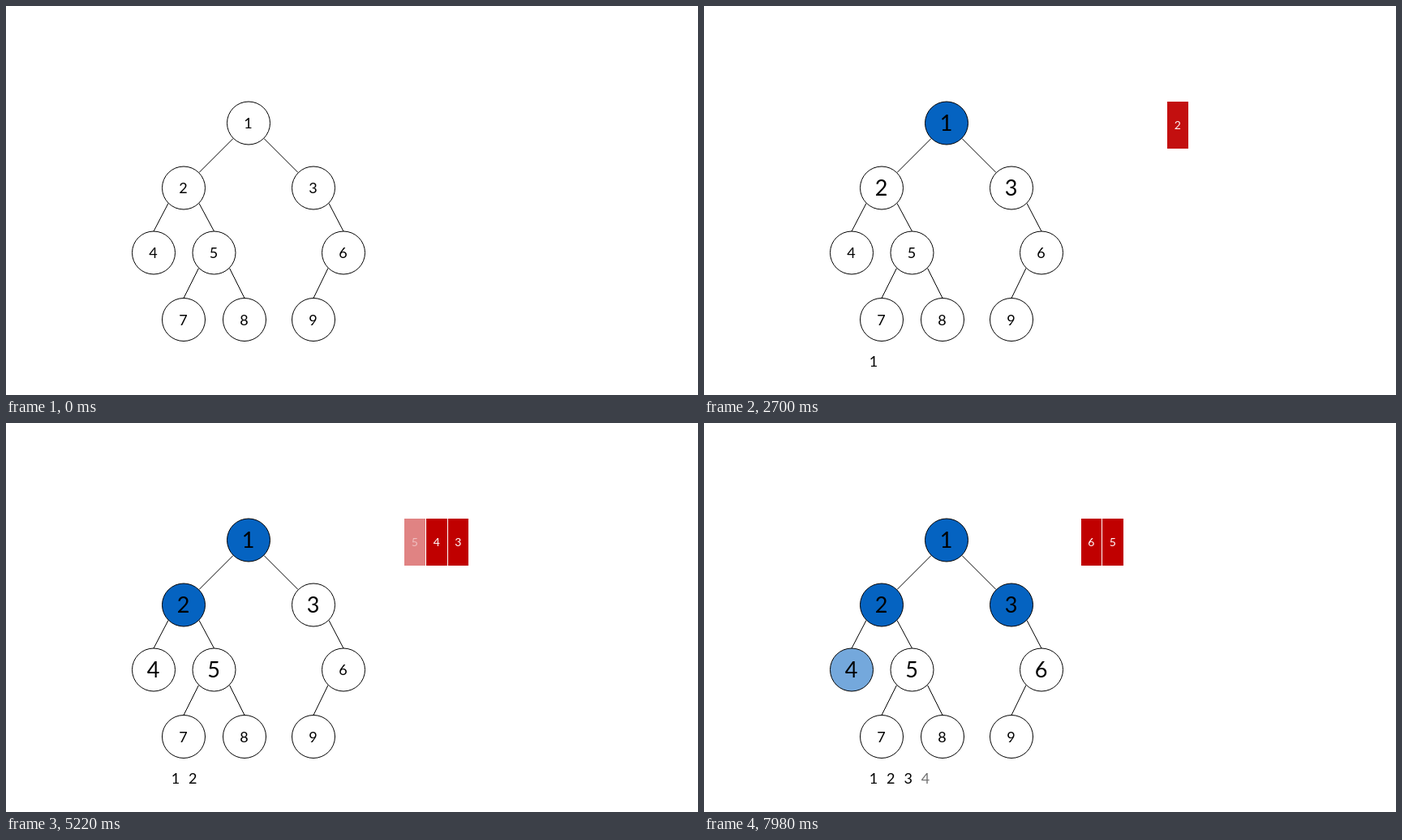
These frames come from a looping animation (853x480 px, 8 s). An HTML page with a canvas:

```html
<!DOCTYPE html>
<html lang="en">
<head>
<meta charset="utf-8">
<title>Breadth-first traversal</title>
<style>
  html, body { margin: 0; width: 100%; height: 100%; overflow: hidden; background: #fff; }
  canvas { display: block; }
</style>
</head>
<body>
<canvas id="stage" width="853" height="480"></canvas>
<script>
const ctx = document.getElementById('stage').getContext('2d');
const LOOP = 8000, TICK = 60, STEP = 454.5;
const RADIUS = 26.5, SMALL = 18, LARGE = 27;
const BLUE = [5, 99, 193];

// Tree nodes in level order, with the index of their parent.
const nodes = [
  { x: 299, y: 144.5 },
  { x: 219, y: 224.5, parent: 0 },
  { x: 379, y: 224.5, parent: 0 },
  { x: 182, y: 304.5, parent: 1 },
  { x: 256.5, y: 304.5, parent: 1 },
  { x: 416, y: 304.5, parent: 2 },
  { x: 219, y: 387, parent: 4 },
  { x: 294, y: 387, parent: 4 },
  { x: 379, y: 387, parent: 5 }
];

// Each phase lasts one STEP: discover children, enqueue each, dequeue, visit.
let phase = 0;
const discover = ids => {
  if (!ids.length) return;
  ids.forEach(i => nodes[i].grow = phase);
  phase++;
  ids.forEach(i => nodes[i].enqueue = phase++);
};
discover([0]);
nodes.forEach((node, i) => {
  node.dequeue = phase++;
  node.visit = phase++;
  discover(nodes.flatMap((n, k) => n.parent === i ? [k] : []));
});

const progress = (now, start) => Math.min(1, Math.max(0, now - start));

function label(text, x, y, size, color) {
  ctx.font = `${size}px Lato, sans-serif`;
  ctx.fillStyle = color;
  ctx.fillText(text, x, y + size * 0.365);
}

function drawEdge(child) {
  const parent = nodes[child.parent];
  const side = Math.sign(child.x - parent.x);
  const corner = child.parent === 0;
  ctx.beginPath();
  ctx.moveTo(parent.x + side * 19, parent.y + 19);
  ctx.lineTo(child.x - (corner ? side * 19 : 0), child.y - (corner ? 19 : RADIUS));
  ctx.stroke();
}

function drawNode(node, i, now) {
  const visited = progress(now, node.visit);
  const rgb = BLUE.map(c => Math.round(255 + (c - 255) * visited));
  ctx.beginPath();
  ctx.arc(node.x, node.y, RADIUS, 0, 2 * Math.PI);
  ctx.fillStyle = `rgb(${rgb})`;
  ctx.fill();
  ctx.stroke();
  const size = SMALL + (LARGE - SMALL) * progress(now, node.grow);
  label(i + 1, node.x - 0.5, node.y, size, '#000');

  ctx.globalAlpha = visited;
  label(i + 1, 209 + 21.3 * i, 438.5, SMALL, '#000');
  ctx.globalAlpha = 1;
}

function drawQueueCell(node, i, now) {
  const edge = k => Math.round(598 - 26.65 * k);
  const left = edge(i), right = edge(i - 1) - 1;
  ctx.globalAlpha = progress(now, node.enqueue) - progress(now, node.dequeue);
  ctx.fillStyle = '#c00000';
  ctx.fillRect(left, 118, right - left, 58);
  label(i + 1, (left + right) / 2 - 0.3, 147, 14, '#fff');
  ctx.globalAlpha = 1;
}

function render(ms) {
  const now = Math.floor(ms % LOOP / TICK) * TICK / STEP;
  ctx.fillStyle = '#fff';
  ctx.fillRect(0, 0, 853, 480);
  ctx.textAlign = 'center';
  ctx.strokeStyle = '#000';
  ctx.lineWidth = 1;
  nodes.slice(1).forEach(drawEdge);
  nodes.forEach((node, i) => {
    drawNode(node, i, now);
    drawQueueCell(node, i, now);
  });
}

const start = performance.now();
function frame() {
  render(performance.now() - start);
  requestAnimationFrame(frame);
}
frame();
</script>
</body>
</html>
```
